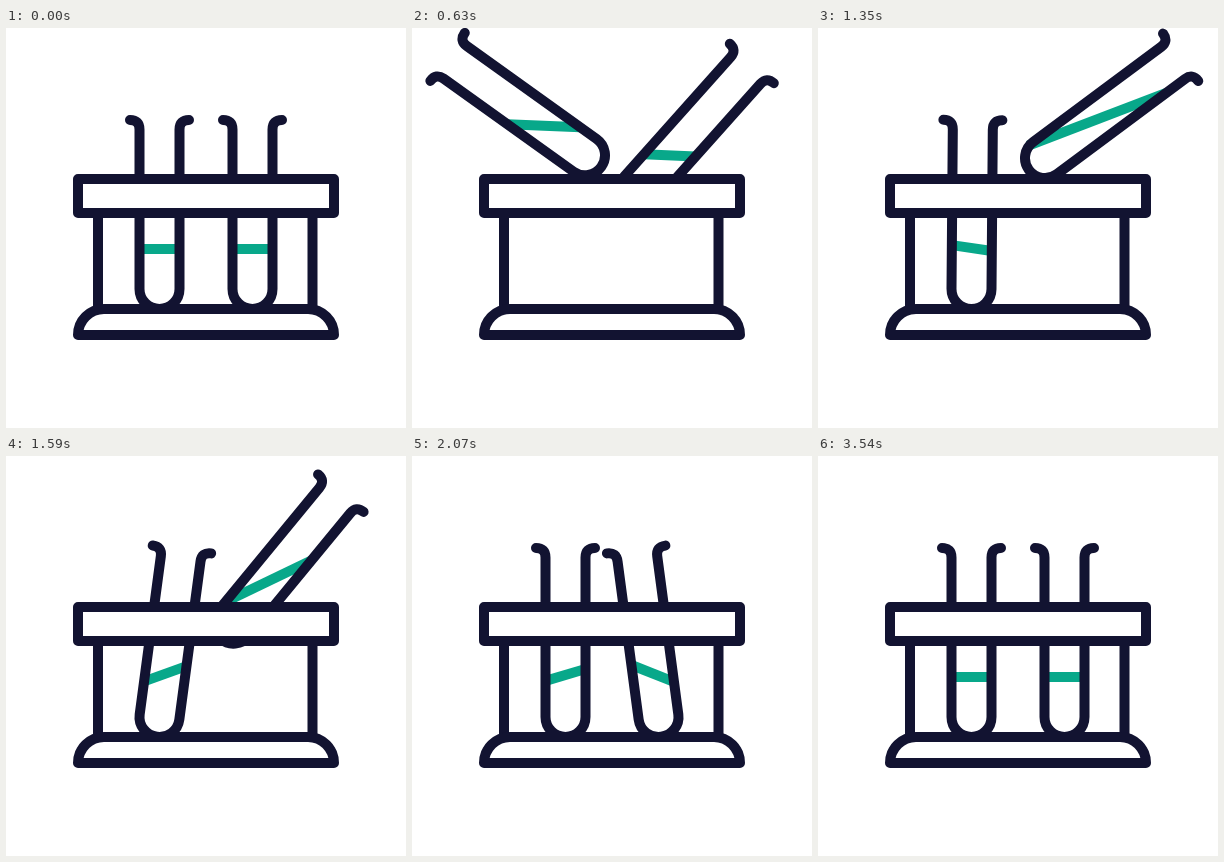
These frames come from a looping animation (400x400 px, 5630 ms). An HTML page:

```html
<!DOCTYPE html>
<html>
<head>
<meta charset="utf-8">
<style>
html, body { margin: 0; height: 100%; overflow: hidden; background: #fff; }
svg { display: block; width: 100%; height: 100%; }
</style>
</head>
<body>
<svg viewBox="0 0 400 400" fill="none" stroke="#121331" stroke-width="10" stroke-linecap="round" stroke-linejoin="round">
  <defs>
    <path id="glass" d="M-29.5-169q9.5 0 9.5 9.5V0A20 20 0 0 0 20 0V-159.5q0-9.5 9.5-9.5"/>
  </defs>
  <g class="tube"><path class="liquid" stroke="#08a88a" stroke-linecap="butt"/><use href="#glass"/></g>
  <g transform="matrix(-1 0 0 1 400 0)">
    <g class="tube"><path class="liquid" stroke="#08a88a" stroke-linecap="butt"/><use href="#glass"/></g>
  </g>
  <path d="M92 185V281M306.5 185V281"/>
  <path fill="#fff" d="M72 151H328V185H72Z"/>
  <path fill="#fff" d="M72 307a26 26 0 0 1 26-26h204a26 26 0 0 1 26 26z"/>
</svg>
<script>
const LOOP = 5630, END = 3540, STEP = 30;
const PEAK = 690, FALL = 650, SWING = 510, DELAY = 460;
const CALM = 3080, HALF_WAVE = 830;

const tubes = document.querySelectorAll('.tube');

// How far a tube is out of the rack: 0 seated, 1 at the top, below 0 swinging past upright
function lift(t, start, peak) {
  if (t <= start) return 0;
  if (t < peak) return 1 - (1 - ((t - start) / (peak - start)) ** 1.4) ** 3;
  const s = t - peak;
  if (s < FALL) return 1 - (s / FALL) ** 3.3;
  return -.14 * Math.sin(Math.PI * Math.min((s - FALL) / SWING, 1));
}

// Tilt of the liquid surface against the horizon, in degrees
function slosh(t) {
  if (t <= 0 || t >= CALM) return 0;
  return 33 * Math.sin(Math.PI * t / CALM) ** 1.5 * Math.sin(Math.PI * (t - CALM) / HALF_WAVE + Math.PI);
}

function draw(t) {
  tubes.forEach((tube, i) => {
    const out = lift(t, i * 100, PEAK + i * DELAY), up = Math.max(out, 0);
    const angle = -54.5 * out;
    const x = 153.5 + 19.5 * (1 - (1 - up) ** 3), y = 261 - 134 * up ** 1.12;
    tube.setAttribute('transform', `translate(${x} ${y}) rotate(${angle})`);

    const tan = Math.tan((slosh(t - i * DELAY) - angle) * Math.PI / 180);
    const level = -40 - 7 * Math.abs(tan);
    tube.querySelector('.liquid').setAttribute('d', `M-20 ${level - 20 * tan}L20 ${level + 20 * tan}`);
  });
}

function tick() {
  const t = performance.now() % LOOP;
  draw(Math.min(Math.floor(t / STEP) * STEP, END));
  requestAnimationFrame(tick);
}
tick();
</script>
</body>
</html>
```
